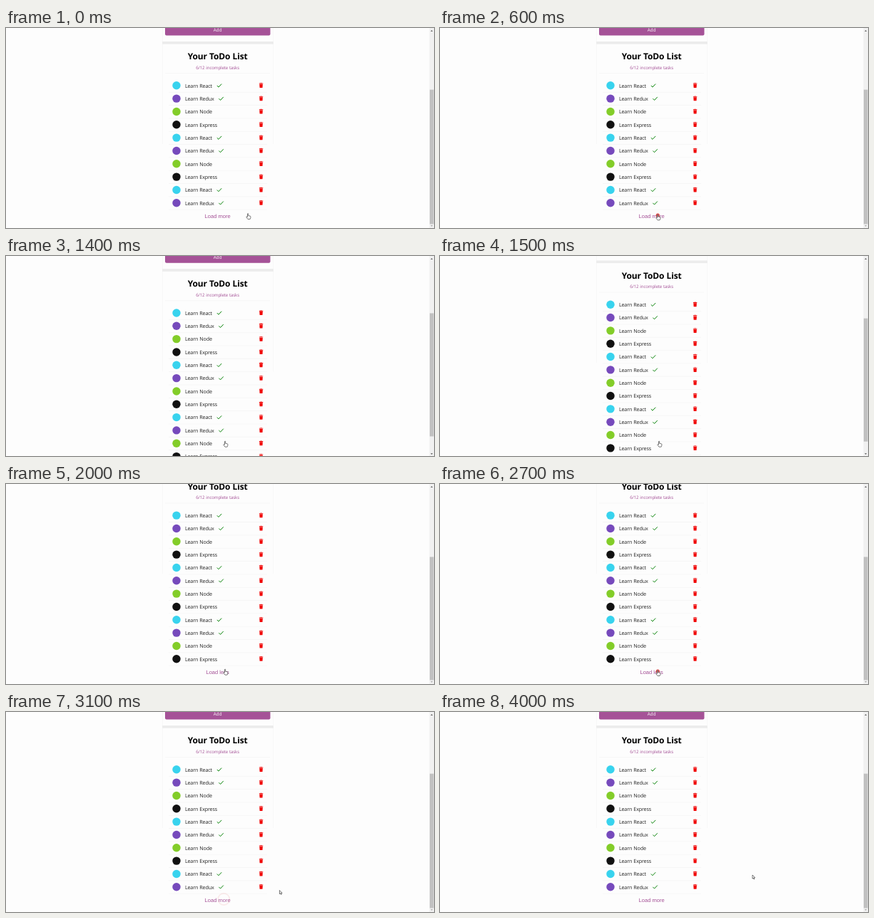
An HTML page that plays this animation: 600 px wide and 281 px high, repeating every 4100 ms.

```html
<!DOCTYPE html>
<html lang="en">
<head>
<meta charset="utf-8">
<title>ToDo list</title>
<style>
  html, body { margin: 0; width: 100%; height: 100%; overflow: hidden; background: #fdfdfd; }
  svg { display: block; width: 100vw; height: 100vh; }
  text { font-family: "Open Sans", "Noto Sans", sans-serif; text-rendering: geometricPrecision; }
  .mid { text-anchor: middle; }
  .title { font-size: 12px; font-weight: 700; letter-spacing: -.15px; word-spacing: .3px; fill: #000; }
  .count { font-size: 6.2px; letter-spacing: -.15px; word-spacing: .4px; fill: #a55297; }
  .task { font-size: 7.2px; letter-spacing: -.17px; word-spacing: .5px; fill: #222; }
  .more { font-family: "Liberation Sans", Arial, sans-serif; font-size: 7.55px; fill: #a55297; }
  .rule { stroke: #f2f2f2; stroke-width: .6; }
  .add { font-size: 6.3px; fill: #fff; }
</style>
</head>
<body>
<svg id="stage" viewBox="0 0 600 281" preserveAspectRatio="none">
  <defs>
    <path id="check" d="M-3.2 .1 L-1 2.3 L3.2 -2.2" fill="none" stroke="#0a840a" stroke-width="1"/>
    <g id="bin" fill="#f00808">
      <path d="M-2.7 -3.1 H-1 L-.7 -3.6 H.7 L1 -3.1 H2.7 V-2.2 H-2.7 Z"/>
      <path d="M-2.3 -1.8 H2.3 L2 2.7 Q2 3.2 1.5 3.2 H-1.5 Q-2 3.2 -2 2.7 Z"/>
    </g>
  </defs>
  <g id="page">
    <path d="M219.5 -20 V163 M374.5 -20 V163" stroke="#f8f8f8"/>
    <rect x="219" y="19" width="156" height="3.6" fill="#ececec"/>
    <rect x="223" y="-10" width="147.5" height="20.6" rx="2" fill="#a55297"/>
    <text class="add mid" x="296.7" y="5.3">Add</text>
    <text class="title mid" x="296.6" y="44.2">Your ToDo List</text>
    <text class="count mid" x="296.6" y="57.9">6/12 incomplete tasks</text>
    <path class="rule" d="M223 63.6 H370"/>
    <g id="rows"></g>
    <text id="more" class="more mid" x="296.6"></text>
  </g>
  <rect x="593.5" width="6.5" height="281" fill="#f1f1f1"/>
  <rect id="thumb" x="594" width="5.6" fill="#c1c1c1"/>
  <path d="M595.2 4.8 L596.8 3 L598.4 4.8 Z" fill="#505050"/>
  <path id="down" d="M595.2 277.2 L596.8 279 L598.4 277.2 Z"/>
  <circle id="ring" cx="305.3" cy="263" fill="#fff" stroke="#e02a2a" stroke-width="1.7"/>
  <path id="hand" d="M-1.5 .8 V-3.4 Q-1.5 -4.1 -.9 -4.1 Q-.3 -4.1 -.3 -3.4 V-1 L2.1 -.6 Q2.9 -.4 2.9 .4 V1.8 L2.1 3.9 H-1 L-3 1.2 Q-3.3 .4 -2.5 .2 Z"
    fill="#fff" stroke="#222" stroke-width=".6" stroke-linejoin="round"/>
  <path id="arrow" d="M0 0 V5.2 L1.2 4.1 L2.1 6 L2.9 5.6 L2.1 3.8 H3.7 Z"
    fill="#fff" stroke="#222" stroke-width=".6" stroke-linejoin="round"/>
</svg>
<script>
const LOOP = 4100, STEP = 100;
const ROW = 18.33, TOP = 81, SHORT = 10, LONG = 12;
const VIEW = 281, SHORT_PAGE = 401, TRACK_TOP = 6, TRACK = 269.5;
const LINK_EDGE = 370;
const $ = id => document.getElementById(id);
const kinds = [
  { name: "Learn React", color: "#38d3ee", tick: 299 },
  { name: "Learn Redux", color: "#764abc", tick: 301.6 },
  { name: "Learn Node", color: "#83cd29" },
  { name: "Learn Express", color: "#111" }
];

$("rows").innerHTML = Array.from({ length: LONG }, (_, i) => {
  const { name, color, tick } = kinds[i % kinds.length];
  return `<g transform="translate(0 ${TOP + i * ROW})">
    <circle cx="239" cy="-.2" r="5.7" fill="${color}"/>
    <text class="task" x="250.9" y="2.6">${name}</text>
    ${tick ? `<use href="#check" x="${tick}" y="-.2"/>` : ""}
    <use href="#bin" x="357.6" y="-.3"/>
    <path class="rule" d="M228 9.2 H366"/>
  </g>`;
}).join("");
const rows = [...$("rows").children];

// Pointer moves that follow one another
const moves = [
  { from: 0, to: 350, x: 306, y: 266 },
  { from: 1200, to: 1400, x: 308, y: 264.3 },
  { from: 2100, to: 2400, x: 299, y: 264.8 },
  { from: 2400, to: 2600, x: 306, y: 265.7 },
  { from: 2900, to: 3400, x: 427, y: 242 },
  { from: 3900, to: 4000, x: 438, y: 229 }
];

const progress = (t, from, to) => Math.min(1, Math.max(0, (t - from) / (to - from)));
const easeOut = p => 1 - (1 - p) ** 2;
const smooth = p => p * p * (3 - 2 * p);

function pointer(t) {
  let x = 340, y = 264.7;
  for (const m of moves) {
    const p = easeOut(progress(t, m.from, m.to));
    x += (m.x - x) * p;
    y += (m.y - y) * p;
  }
  return { x, y };
}

function set(id, attrs) {
  for (const k in attrs) $(id).setAttribute(k, attrs[k]);
}

function show(el, on) {
  el.setAttribute("visibility", on ? "visible" : "hidden");
}

function drawPage(t) {
  const open = t >= 700 && t < 2800;
  const count = open ? LONG : SHORT;
  const extra = (count - SHORT) * ROW;
  const scroll = extra * smooth(progress(t, 1370, 1700));
  rows.forEach((row, i) => show(row, i < count));
  set("page", { transform: `translate(0 ${-scroll})` });
  set("more", { y: TOP + count * ROW + 2.7 });
  $("more").textContent = open ? "Load less" : "Load more";

  const ratio = TRACK / (SHORT_PAGE + extra);
  set("thumb", { y: TRACK_TOP + (SHORT_PAGE - VIEW + scroll) * ratio, height: VIEW * ratio });
  set("down", { fill: scroll < extra ? "#505050" : "#a3a3a3" });
}

function drawRing(t) {
  const age = t - (t < 2700 ? 600 : 2700);
  const alpha = .85 * (1 - progress(age, 0, 500)) ** 1.4;
  set("ring", { r: 1.7 + Math.max(0, age) * .016, "stroke-opacity": alpha, "fill-opacity": alpha });
  show($("ring"), age >= 0 && age < 500);
}

function drawPointer(t) {
  const { x, y } = pointer(t), overLink = x < LINK_EDGE;
  for (const id of ["hand", "arrow"]) {
    set(id, { transform: `translate(${x} ${y})` });
    show($(id), (id === "hand") === overLink);
  }
}

const begin = performance.now();
function tick() {
  const now = (performance.now() - begin) % LOOP;
  const t = Math.floor(now / STEP) * STEP;
  drawPage(t);
  drawRing(t);
  drawPointer(t);
  requestAnimationFrame(tick);
}
tick();
</script>
</body>
</html>
```
